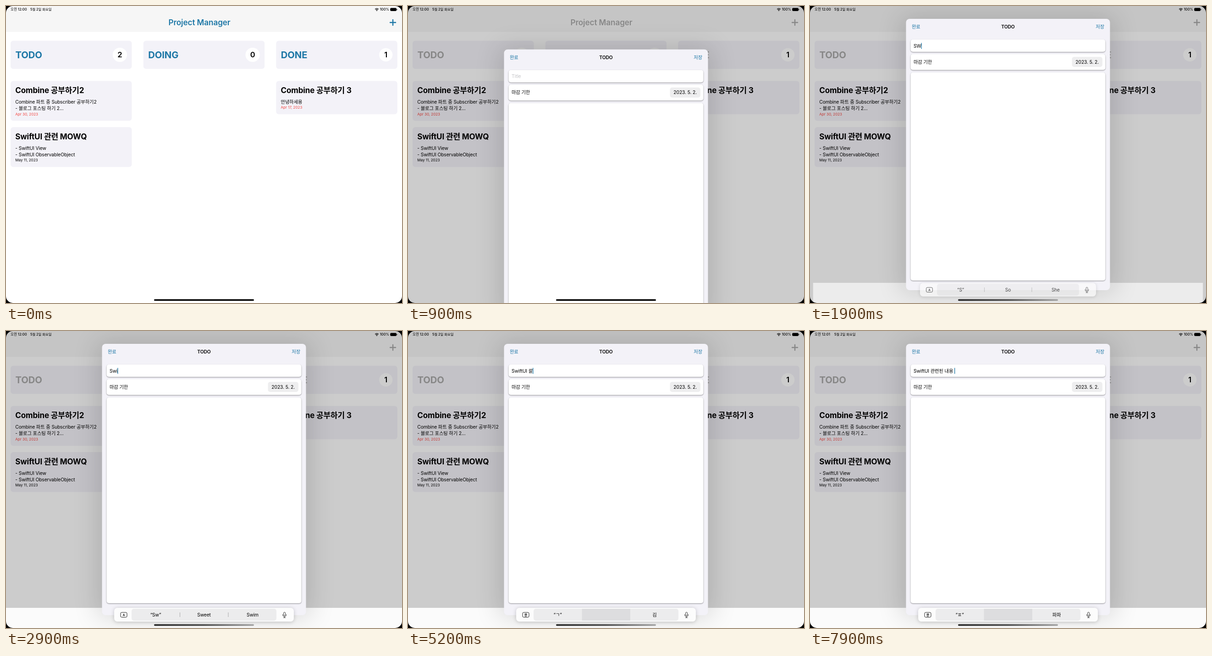
These frames come from a looping animation (864 by 648 pixels, 8 s). An HTML page:

```html
<!DOCTYPE html>
<html lang="ko">
<head>
<meta charset="utf-8">
<title>Project Manager</title>
<style>
  html, body { margin: 0; width: 100%; height: 100%; overflow: hidden; background: #fff; }
  svg { display: block; width: 100vw; height: 100vh; }
  text { font: 10.3px Inter, "Noto Sans CJK KR", "Noto Sans CJK", sans-serif; letter-spacing: -.12px; white-space: pre; }
  .status { font-size: 7.5px; font-weight: 500; letter-spacing: 0; }
  .nav { font-size: 17.1px; font-weight: 600; letter-spacing: -.08px; }
  .head { font-size: 20.3px; font-weight: 700; letter-spacing: -.1px; }
  .count { font-size: 16.5px; font-weight: 600; }
  .name { font-size: 17px; font-weight: 700; letter-spacing: -.14px; }
  .date { font-size: 8px; letter-spacing: 0; }
  .bold { font-weight: 600; }
  .mid { text-anchor: middle; }
  .end { text-anchor: end; }
  .link { fill: #1d77a6; }
  .field rect { fill: #fff; filter: drop-shadow(0 1px .8px rgba(0,0,0,.42)); }
  #bar > .plate { filter: drop-shadow(0 1px 4px rgba(0,0,0,.2)); }
</style>
</head>
<body>
<svg viewBox="0 0 864 648" xmlns="http://www.w3.org/2000/svg">
  <defs>
    <filter id="soft" x="-40%" y="-30%" width="180%" height="160%"><feGaussianBlur stdDeviation="28"/></filter>
    <linearGradient id="fade">
      <stop offset="0" stop-color="#222"/><stop offset=".5" stop-color="#484848"/><stop offset="1" stop-color="#a2a2a2"/>
    </linearGradient>
  </defs>
  <rect width="864" height="648" fill="#fff"/>
  <rect width="864" height="56.5" fill="#f6f6f6"/>
  <g id="tint">
    <text class="nav mid" x="422" y="42">Project Manager</text>
    <path d="M838.100 36h12M844.100 30v12" fill="none" stroke="currentColor" stroke-width="2.4" stroke-linecap="round"/>
  </g>
  <g id="board"></g>
  <rect id="dim" width="864" height="648"/>
  <rect id="tray" y="604" height="44" fill="#fff"/>

  <g id="sheet">
    <rect x="200" y="24" width="464" height="600" filter="url(#soft)" opacity=".14"/>
    <rect x="209.500" y="28" width="445" height="592" rx="8" fill="#f3f2f8"/>
    <text class="link" x="222" y="49">완료</text>
    <text class="bold mid" x="432" y="49">TODO</text>
    <text class="link end" x="642" y="49">저장</text>
    <g class="field">
      <rect x="219.500" y="73" width="425" height="27" rx="5"/>
      <rect x="219.500" y="105" width="425" height="34.500" rx="5"/>
      <rect id="area" x="219.500" y="145" width="425" rx="5"/>
    </g>
    <text id="hint" x="226" y="90.700" fill="#c4c4c7">Title</text>
    <text id="input" x="226" y="90.700"></text>
    <rect id="caret" y="80.500" width="1.300" height="13" fill="#1d77a6"/>
    <text x="226" y="125.700">마감 기한</text>
    <rect x="571.500" y="111" width="66.500" height="22" rx="5" fill="#eeeeef"/>
    <text class="mid" x="604.700" y="125.700">2023. 5. 2.</text>
  </g>

  <g id="bar">
    <rect class="plate" x="236" y="604" width="392" height="30" rx="7" fill="#fcfcfc"/>
    <rect x="274" y="606" width="316" height="26" rx="5" fill="#ececed"/>
    <rect id="cell" x="379.500" y="606" width="105.500" height="26" fill="#dddddf"/>
    <path id="split" d="M379.500 614v10M485 614v10" stroke="#aaa"/>
    <rect x="250" y="614" width="14" height="10.500" rx="2.500" fill="none" stroke="#222"/>
    <text id="lang" class="mid" x="257" y="621.800" style="font-size:6.5px;font-weight:600"></text>
    <text class="word mid" x="326.500" y="622.700"></text>
    <text class="word mid" x="432" y="622.700"></text>
    <text class="word mid" x="538" y="622.700"></text>
    <g fill="none" stroke="#333">
      <rect x="605.700" y="613.500" width="3.800" height="7.500" rx="1.900"/>
      <path d="M603.600 618.500v.5a4 4 0 0 0 8 0v-.5M607.600 623v2.500M605.500 625.500h4.200" stroke-linecap="round"/>
    </g>
  </g>

  <text class="status" id="clock" x="10" y="10.300"></text>
  <text class="status" x="53" y="10.300" style="font-size:7.3px">5월 2일 화요일</text>
  <path d="M805.200 7a5.400 5.400 0 0 1 7.600 0M806.800 8.700a3.200 3.200 0 0 1 4.400 0" fill="none" stroke="#000" stroke-width="1.200"/>
  <circle cx="809" cy="10.200" r=".9"/>
  <text class="status end" x="836" y="10.300">100%</text>
  <rect x="838.300" y="4.300" width="13.700" height="6.700" rx="2"/>
  <rect x="852.600" y="6.500" width="1" height="2.400" rx=".5"/>
  <rect id="home" x="323" y="639.800" width="218" height="3.400" rx="1.700"/>
  <path fill-rule="evenodd" d="M0 0H864V648H0ZM15 0H849A15 15 0 0 1 864 15V633A15 15 0 0 1 849 648H15A15 15 0 0 1 0 633V15A15 15 0 0 1 15 0Z"/>
</svg>
<script>
const $ = id => document.getElementById(id);
const LOOP = 8000, STEP = 100;

const card = (x, y, h) => `<rect x="${x}" y="${y}" width="264.500" height="${h}" rx="6" fill="#f3f2f8"/>`;
const label = (cls, x, y, s, extra = '') => `<text class="${cls}" x="${x}" y="${y}" ${extra}>${s}</text>`;

function header(x, name, count, r) {
  const cx = x + (x > 500 ? 239.5 : 238.4);
  return card(x, 75.8, 61.5) + label('head', x + 10.5, 114, name, 'fill="currentColor"') +
    `<circle cx="${cx}" cy="106.500" r="${r}" fill="#fff"/>` + label('count mid', cx, 112.4, count);
}

function task(x, y, name, lines, date, late) {
  const last = y + 49.8 + (lines.length - 1) * 14.2;
  return card(x, y, last - y + 23) + label('name', x + 10.3, y + 26.5, name) +
    lines.map((s, i) => label('', x + 10.3, y + 49.8 + i * 14.2, s)).join('') +
    label('date', x + 10.3, last + 11.2, date, late ? 'fill="#f4453f"' : '');
}

$('board').innerHTML =
  header(10, 'TODO', 2, 15.6) + header(299.7, 'DOING', 0, 15.6) + header(589.3, 'DONE', 1, 14.6) +
  task(10, 163.4, 'Combine 공부하기2', ['Combine 파트 중 Subscriber 공부하기2', '- 블로그 포스팅 하기 2...'], 'Apr 30, 2023', true) +
  task(10, 264.2, 'SwiftUI 관련 MOWQ', ['- SwiftUI View', '- SwiftUI ObservableObject'], 'May 11, 2023', false) +
  task(589.3, 163.4, 'Combine 공부하기 3', ['안녕하세용'], 'Apr 17, 2023', true);

// time in tenths of a second, then the field's text
const typed = [
  [0, ''], [18, 'S'], [19, 'SW'], [26, 'S'], [28, 'Sw'], [29, 'Swi'], [31, 'Swif'], [33, 'Swift'],
  [39, 'SwiftU'], [40, 'SwiftUI'], [44, 'SwiftUI '], [50, 'SwiftUI ㄱ'], [51, 'SwiftUI 과'],
  [52, 'SwiftUI 괄'], [53, 'SwiftUI 괄ㄹ'], [54, 'SwiftUI 괄려'], [56, 'SwiftUI 괄련'],
  [57, 'SwiftUI 괄려'], [58, 'SwiftUI 괄ㄹ'], [59, 'SwiftUI 괄'], [60, 'SwiftUI 과'],
  [63, 'SwiftUI 관'], [65, 'SwiftUI 관ㄹ'], [67, 'SwiftUI 관려'], [68, 'SwiftUI 관련'],
  [69, 'SwiftUI 관련되'], [70, 'SwiftUI 관련된'], [71, 'SwiftUI 관련된 '], [72, 'SwiftUI 관련된 ㄴ'],
  [73, 'SwiftUI 관련된 내'], [74, 'SwiftUI 관련된 내요'], [75, 'SwiftUI 관련된 내용'],
  [76, 'SwiftUI 관련된 내용 '], [77, 'SwiftUI 관련된 내용 ㅍ'], [79, 'SwiftUI 관련된 내용 ']
];

// suggestions: time, left, middle, right
const hints = [
  [0, '', '', ''], [18, '“S”', 'So', 'She'], [20, '“SW”', 'Sweet', 'Swim'], [26, '“S”', 'So', 'She'],
  [29, '“Sw”', 'Sweet', 'Swim'], [31, '“Swi”', 'Swim', 'Swift'], [34, '“Swift”', 'SwiftUI', 'Swiftly'],
  [42, '“SwiftUI”', '', ''], [48, '', '', ''], [52, '“ㄱ”', '', '김'], [54, '“괄”', '', '괄호'],
  [59, '“괄ㄹ”', '', '관련'], [60, '“괄”', '', '괄호'], [64, '“관”', '', '관련'], [67, '“관ㄹ”', '', '관련'],
  [69, '“관련”', '', '관련된'], [71, '“관련된”', '', '관련된'], [73, '“ㄴ”', '', '나'],
  [75, '“내”', '', '내용'], [76, '“내용”', '', '내용은'], [79, '“ㅍ”', '', '파파']
];

const at = (list, t) => list.findLast(e => e[0] * 100 <= t);
const words = document.querySelectorAll('.word');
const set = (id, attrs) => {
  for (const k in attrs) $(id).setAttribute(k, attrs[k]);
};
const show = (id, on) => set(id, { visibility: on ? 'inherit' : 'hidden' });

// share of the way still to go in a critically damped spring
function rest(ms) {
  const a = Math.max(0, ms) * 0.01826;
  return (1 + a) * Math.exp(-a);
}

function draw(t) {
  const open = t >= 800;
  const left = open ? rest(t - 692) : 1;
  const dim = open ? Math.min(1, (1 - left) * 1.12) : 0;
  const kb = 1 - rest(t - 1768);
  const inset = 22 * (1 - kb);
  const korean = t >= 4800;

  const tint = open ? '#a8a8a8' : '#1d77a6';
  $('board').style.color = $('tint').style.color = tint;
  set('tint', { fill: tint });
  set('dim', { opacity: 0.2 * dim });
  show('sheet', open);
  set('sheet', { transform: `translate(0 ${(620 * left).toFixed(2)})` });
  set('area', { height: 465 - 16 * kb });

  set('tray', { opacity: kb * 0.92, x: inset, width: 864 - 2 * inset });
  const s = 1 - 0.065 * (1 - kb);
  set('bar', { opacity: kb, transform: `translate(432 619) scale(${s}) translate(-432 -619)` });
  set('home', { fill: kb > 0.3 ? 'url(#fade)' : '#000' });

  const value = at(typed, t)[1];
  $('input').textContent = value;
  show('hint', !value);
  show('caret', t >= 1700);
  set('caret', { x: 226 + (value ? $('input').getComputedTextLength() : 0) });

  const hint = at(hints, t);
  words.forEach((w, i) => w.textContent = hint[i + 1]);
  $('lang').textContent = korean ? '한' : 'A';
  show('cell', korean);
  show('split', !korean);
  $('clock').textContent = t < 5700 ? '오전 12:00' : '오전 12:01';
}

const start = performance.now();
function tick() {
  const t = (performance.now() - start) % LOOP;
  draw(Math.floor(t / STEP) * STEP);
  requestAnimationFrame(tick);
}
tick();
</script>
</body>
</html>
```
